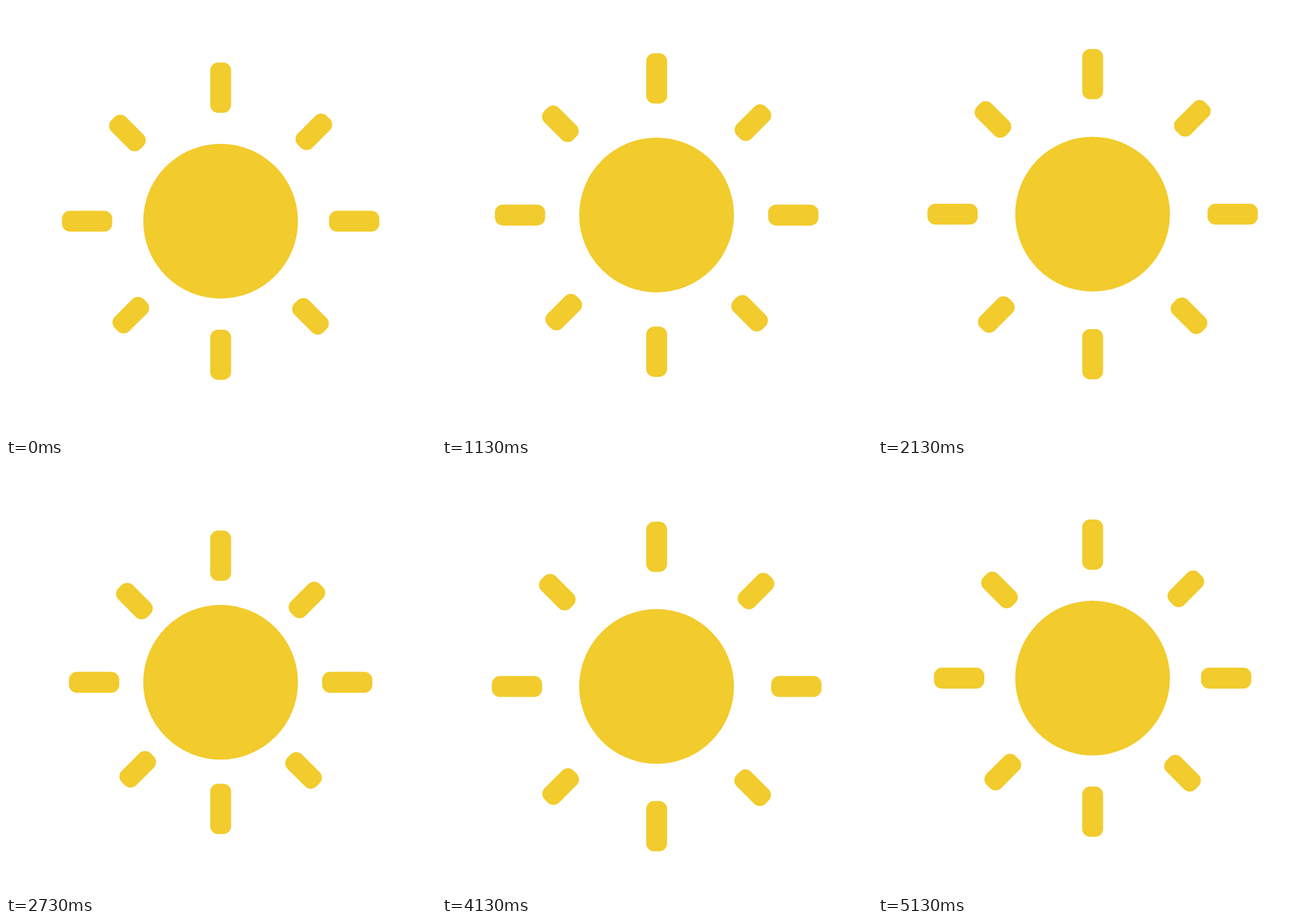
Recreate the animation shown at these times as an HTML page. Size 748 by 748 pixels, loop 5730 ms.

```html
<!DOCTYPE html>
<html lang="en">
<head>
<meta charset="utf-8">
<title>Sun</title>
<style>
  html, body { margin: 0; width: 100%; height: 100%; overflow: hidden; background: #fff; }
  svg { display: block; width: 100vw; height: 100vh; fill: #f2cb2d; }
</style>
</head>
<body>
<svg viewBox="0 0 748 748">
  <g id="sun"><circle cx="373.3" cy="374.3" r="134.6"/></g>
</svg>
<script>
const LOOP = 5730, TICK = 37.5, FRAME = 40, LAST = 128;
const CX = 373.4, CY = 374.4, REACH = 232.3, SWAY = 12.8;
const sun = document.getElementById('sun');
const wave = turns => Math.sin(2 * Math.PI * turns);

function makeRay(dx, dy) {
  const diagonal = dx && dy;
  const length = diagonal ? 71 : 87.5;
  const width = diagonal ? 35.5 : 36.4;
  const el = document.createElementNS('http://www.w3.org/2000/svg', 'rect');
  const attrs = { x: -length / 2, y: -width / 2, width: length, height: width, rx: 14 };
  for (const name in attrs) el.setAttribute(name, attrs[name]);
  sun.append(el);

  // Diagonal rays sit a little low and close in towards the bottom
  const x = CX + dx * (diagonal ? 159.2 - 2.9 * dy : REACH);
  const y = CY + (diagonal ? 5 + dy * 159.4 + dx * dy : dy * REACH);
  return { el, x, y, dx, dy, turn: Math.atan2(dy, dx) * 180 / Math.PI };
}

const rays = [];
for (let dx = -1; dx <= 1; dx++) {
  for (let dy = -1; dy <= 1; dy++) {
    if (dx || dy) rays.push(makeRay(dx, dy));
  }
}

// Both swings make four turns, at a pace that rises and falls
const bob = frame => SWAY * wave(frame / 32 - 0.085 * wave(frame / 64));

function spread(frame) {
  const drift = 0.125 * (frame / 105) ** 2;
  return -SWAY * wave(Math.min(4, frame / 30 + drift - 0.105 * wave(frame / 58)));
}

function draw() {
  const time = performance.now() % LOOP;
  const tick = Math.floor((time + 4) / TICK);
  const frame = Math.min(LAST, Math.floor(tick * TICK / FRAME));
  const out = spread(frame);
  sun.setAttribute('transform', `translate(0 ${bob(frame)})`);
  for (const { el, x, y, dx, dy, turn } of rays) {
    el.setAttribute('transform', `translate(${x + dx * out} ${y + dy * out}) rotate(${turn})`);
  }
  requestAnimationFrame(draw);
}
draw();
</script>
</body>
</html>
```
